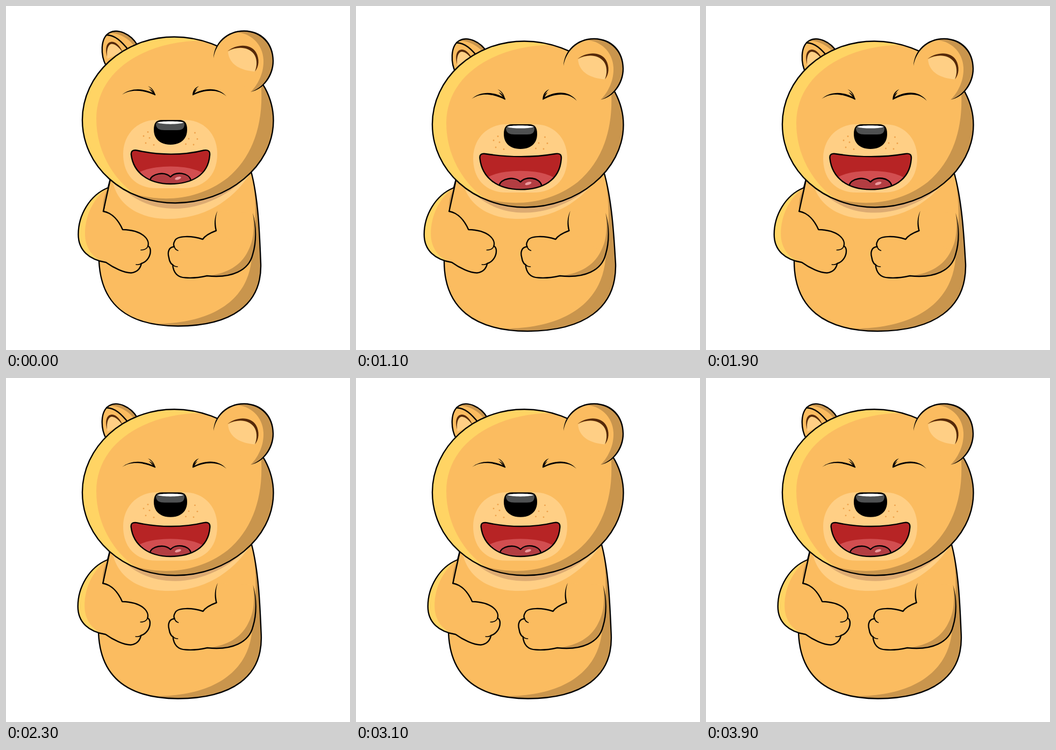
These frames come from a looping animation (640 by 640 pixels, 4000 ms). An HTML page:

```html
<!DOCTYPE html>
<html lang="en">
<head>
<meta charset="utf-8">
<title>Laughing bear</title>
<style>
  html, body { margin: 0; width: 100%; height: 100%; overflow: hidden; background: #fff; }
  svg { display: block; width: 100vw; height: 100vh; }
  .fur { fill: #fbbc60; }
  .dark { fill: #c9954d; }
  .gold { fill: #ffd464; }
  .pale { fill: #ffcf85; }
  .brown { fill: #55290a; }
  .line { fill: none; stroke: #000; stroke-width: 2.4; stroke-linecap: round; stroke-linejoin: round; }
  .thin { stroke-width: 1.7; }
</style>
</head>
<body>
<svg viewBox="0 0 640 640">
  <defs>
    <path id="mouthShape"/>
    <clipPath id="mouthClip"><use href="#mouthShape"/></clipPath>
    <path id="skull" d="M313 57.5C408 57.5 497.5 128 497.5 213C497.5 298 412 366.5 315 366.5C218 366.5 142 298 142 212C142 128 218 57.5 313 57.5Z"/>
    <clipPath id="skullClip"><use href="#skull"/></clipPath>
    <path id="armL" d="M190 338C155 352 134.5 390 134.5 425C134.5 455 155 472 186 477C200 487 220 497 233 496.5C245 495 250 488 252 479C262 476 270 465 268.5 453C267.5 449 266 447 264 447C268 435 255 417 217 416C210 400 198 385 181 382"/>
    <path id="armR" d="M391 418C380 422 370 428 366 434C345 427 318 427 314 437C311 442 312 446 313 448C303 448 300 458 303 468C304 476 308 481 310 481C311 492 316 505 334 505.5C350 507 365 504 374 502C420 507 452 492 459 462"/>
    <path id="earL" d="M186 111C176 92 175 60 192 50C208 41 232 52 244 72"/>
  </defs>

  <path id="body" class="fur"/>
  <path id="bodyShade" class="dark"/>
  <path class="pale" d="M197 318C203 368 245 396 302 396C365 396 420 365 454 312Z"/>
  <path id="bodyLine" class="line"/>

  <g id="leftArm">
    <use href="#armL" class="fur"/>
    <path class="gold" d="M190 338C155 352 134.5 390 134.5 425C134.5 455 155 472 186 477C160 470 147 448 147 424C147 390 163 356 190 338Z"/>
    <path class="dark" d="M191 337C183 350 179 366 181 382L191 342Z"/>
    <use href="#armL" class="line"/>
    <path class="line" d="M195 318L181 382"/>
    <path class="line thin" d="M264 447C262 452 256 454 251 454M252 479Q248 482 242 481"/>
  </g>

  <g id="rightArm">
    <path class="fur" d="M393 382L391 418L459 462C466 440 466 410 459 385Z"/>
    <use href="#armR" class="fur"/>
    <path class="dark" d="M374 502C420 507 452 492 459 462C466 440 466 410 459 385C463 420 460 440 447 462C432 487 405 499 374 502Z"/>
    <use href="#armR" class="line"/>
    <path d="M393.5 381C388.5 395 390 408 392.2 418L389.8 418C387 407 387 394 393.5 381Z"/>
    <path d="M459 385C467 410 467.4 440 460.1 462.5L457.9 461.5C464.7 440 465 410 459 385Z"/>
    <path class="line thin" d="M313 447Q314 453 320 455M310 481Q313 485 319 485"/>
  </g>

  <path id="neckShadow" fill="#ddab72" d="M200 322C235 362 270 377 315 377C365 377 420 350 452 312Z"/>

  <g id="leftEar">
    <use href="#earL" class="fur"/>
    <path class="dark" d="M192 50C208 41 232 52 244 72L238 74C228 60 210 50 192 50Z"/>
    <path class="pale" d="M189 98C186 82 190 70 197 70C205 71 211 78 216 86Z"/>
    <path class="brown" d="M188 94C184 78 187 67 197 66.5C206 67 213 76 217 86C210 77 204 71 197 70.5C190 71 187 81 188 94Z"/>
    <path class="line" d="M187 54C203 54 215 66 228 82"/>
    <use href="#earL" class="line"/>
  </g>

  <g id="head">
    <use href="#skull" class="fur"/>
    <g clip-path="url(#skullClip)">
      <path class="gold" d="M366 64C250 66 168 125 168 210C168 265 195 320 245 354L130 370V50H350Z"/>
      <path class="dark" d="M473 130C483 215 460 280 412 320C360 360 295 366 240 350V375H505V130Z"/>
    </g>
    <use href="#skull" class="line"/>

    <path class="pale" d="M280 212H332C370 212 393 240 393 275C393 318 365 339 330 339H280C245 339 218 318 218 275C218 240 243 212 280 212Z"/>
    <g id="freckles" fill="#eda04a"></g>

    <path d="M290 212H322C333 212 337 218 337 230C337 250 322 258 306 258C290 258 275 250 275 230C275 218 279 212 290 212Z"/>
    <path fill="#4f5152" d="M279 219C279 228 285 231 295 231H318C328 231 332 228 332 219C330 214 282 214 279 219Z"/>
    <path fill="#fff" d="M281 217C284 213.5 328 213.5 331 217C320 220.5 292 220.5 281 217Z"/>

    <g id="eyes">
      <path d="M216 165C232 152 256 152 278 164L278 166.5C256 156 232 154 216 165Z"/>
      <path d="M278 166C276 158 272 152 264 149C271 154 274 158 276 164ZM277 165C275 160 272 156 266 154C270 158 273 161 275 164Z"/>
      <path d="M347 166.5L347.5 164C368 152 395 150 410 168C395 154 370 155 347 166.5Z"/>
      <path d="M347 166C347 158 351 152 359 149C353 154 350 158 349 164ZM348 165C349 160 352 156 356 154C353 158 351 161 350 164Z"/>
    </g>

    <use href="#mouthShape" fill="#b72425"/>
    <g clip-path="url(#mouthClip)">
      <g id="tongue">
        <ellipse cx="306" cy="322" rx="69" ry="23.5" fill="#d24e50"/>
        <path class="line" style="fill:#b33d42" d="M268 324C270 312 295 307 306 318C316 307 340 310 344 324L335 340H275Z"/>
        <ellipse cx="320" cy="320.5" rx="6" ry="2.5" fill="#eb9a9e" transform="rotate(-17 320 320.5)"/>
      </g>
    </g>
    <use href="#mouthShape" class="line"/>
  </g>

  <g id="rightEar">
    <path class="fur" d="M386 97C388 70 410 46 443 46.5C475 47 497 70 497 102C497 130 478 154 455 160Z"/>
    <path class="dark" d="M425 49C431 47 437 46.5 443 46.5C475 47 497 70 497 102C497 130 478 154 455 160C471 144 480 122 479 100C478 70 453 48 425 49Z"/>
    <path class="pale" d="M413 85C430 75 450 76 461 89C467 97 468 110 463 122C438 120 415 110 413 85Z"/>
    <path class="brown" d="M412 84C430 70 455 70 465 86C472 98 471 113 463 122C468 110 467 97 461 89C450 75 430 75 412 84Z"/>
    <path d="M386 97C387 69 410 45.3 443 45.3C476 45.5 498.2 69 498.2 102C498.2 131 479 155 455 160C477 153 495.8 129 495.8 102C495.8 71 474 48 443 47.7C411 47.7 390 71 386 97Z"/>
  </g>
</svg>

<script>
const STEP = 100, LOOP = 4000, BEAT = 800, LEAD = 20;
const el = id => document.getElementById(id);

const dots = [[264, 234.5], [256, 242], [267, 245.5], [260, 255], [275, 258.5],
              [351.5, 236], [340, 247], [356, 247.5], [349, 258], [334.5, 257]];
el('freckles').innerHTML = dots.map(([x, y]) => `<circle cx="${x}" cy="${y}" r="1.4"/>`).join('');

const wave = t => (1 - Math.cos(2 * Math.PI * (t + LEAD) / BEAT)) / 2;
const move = (id, x, y) => el(id).setAttribute('transform', `translate(${x} ${y})`);
const stretch = (id, x, y, sx, sy) =>
  el(id).setAttribute('transform', `translate(${x} ${y}) scale(${sx} ${sy}) translate(${-x} ${-y})`);
const shape = (id, d) => el(id).setAttribute('d', d);

// point that drifts by (dx, dy) as the laugh swells
const drift = q => (x, y, dx, dy) => `${(x + dx * q).toFixed(2)} ${(y + dy * q).toFixed(2)} `;

function drawBody(p) {
  const neckL = p(195, 318, -8.7, 0), neckR = p(456, 308, 5.5, 0);
  const base = p(320, 595.5, -1, 10.5), hip = p(474, 480, 10, 0);
  const ribHigh = p(470, 360, 7, 0), ribLow = p(472, 430, 9, 0);
  const seatHigh = p(476, 555, 10, 8), seatLow = p(420, 595, 5, 10.5);
  const left = `M${neckL}C${p(183, 362, -9, 0)}${p(173, 420, -10, 0)}${p(173, 475, -10, 0)}` +
    `C${p(177, 555, -14.5, 8)}${p(225, 595, -5, 10.5)}${base}`;
  const right = `C${seatLow}${seatHigh}${hip}C${ribLow}${ribHigh}${neckR}`;
  shape('body', left + right + 'L440 285L210 285Z');
  shape('bodyLine', left + right);
  shape('bodyShade', `M${neckR}C${ribHigh}${ribLow}${hip}C${seatHigh}${seatLow}${base}` +
    `L${p(275, 591, -2, 10)}C${p(380, 592, 4, 10)}${p(450, 550, 8, 6)}${p(457, 470, 8, 0)}` +
    `C${p(465, 420, 7, 0)}${p(468, 360, 6, 0)}${neckR}Z`);
}

function drawMouth(p) {
  const left = p(233, 277, -2.8, -1.5), right = p(379, 278, 3.2, -1.5);
  shape('mouthShape', `M${left}C${p(232, 270, -2.8, -1.7)}${p(236, 267.5, -2.8, -1.7)}${p(243, 268.5, -2.8, -1.7)}` +
    `C${p(285, 278, 0, -4.7)}${p(330, 278, 0, -4.7)}${p(368, 268.5, 3.2, -1.7)}` +
    `C${p(376, 267, 3.2, -1.7)}${p(380, 270, 3.2, -1.7)}${right}` +
    `C${p(376, 315, 3.2, 2.4)}${p(345, 331, 1.5, 2.6)}${p(306, 331, 0, 2.6)}` +
    `C${p(265, 331, -1.5, 2.6)}${p(237, 310, -2.8, 2.4)}${left}Z`);
}

function draw(ms) {
  const t = Math.floor((ms % LOOP) / STEP) * STEP;
  const q = wave(t) - wave(0), p = drift(q);
  drawBody(p);
  drawMouth(p);
  move('leftArm', -8.6 * q, 0);
  move('rightArm', 6 * q, 0);
  move('head', 0, 8.9 * q);
  move('neckShadow', 0, 8.4 * q);
  move('leftEar', 0, 16.2 * q);
  move('rightEar', 0, 16.2 * q);
  stretch('eyes', 312, 165, 1 + 0.01 * q, 1 + 0.15 * q);
  stretch('tongue', 306, 295, 1 + 0.039 * q, 1 + 0.067 * q);
}

const start = performance.now();
function tick() {
  draw(performance.now() - start);
  requestAnimationFrame(tick);
}
tick();
</script>
</body>
</html>
```
